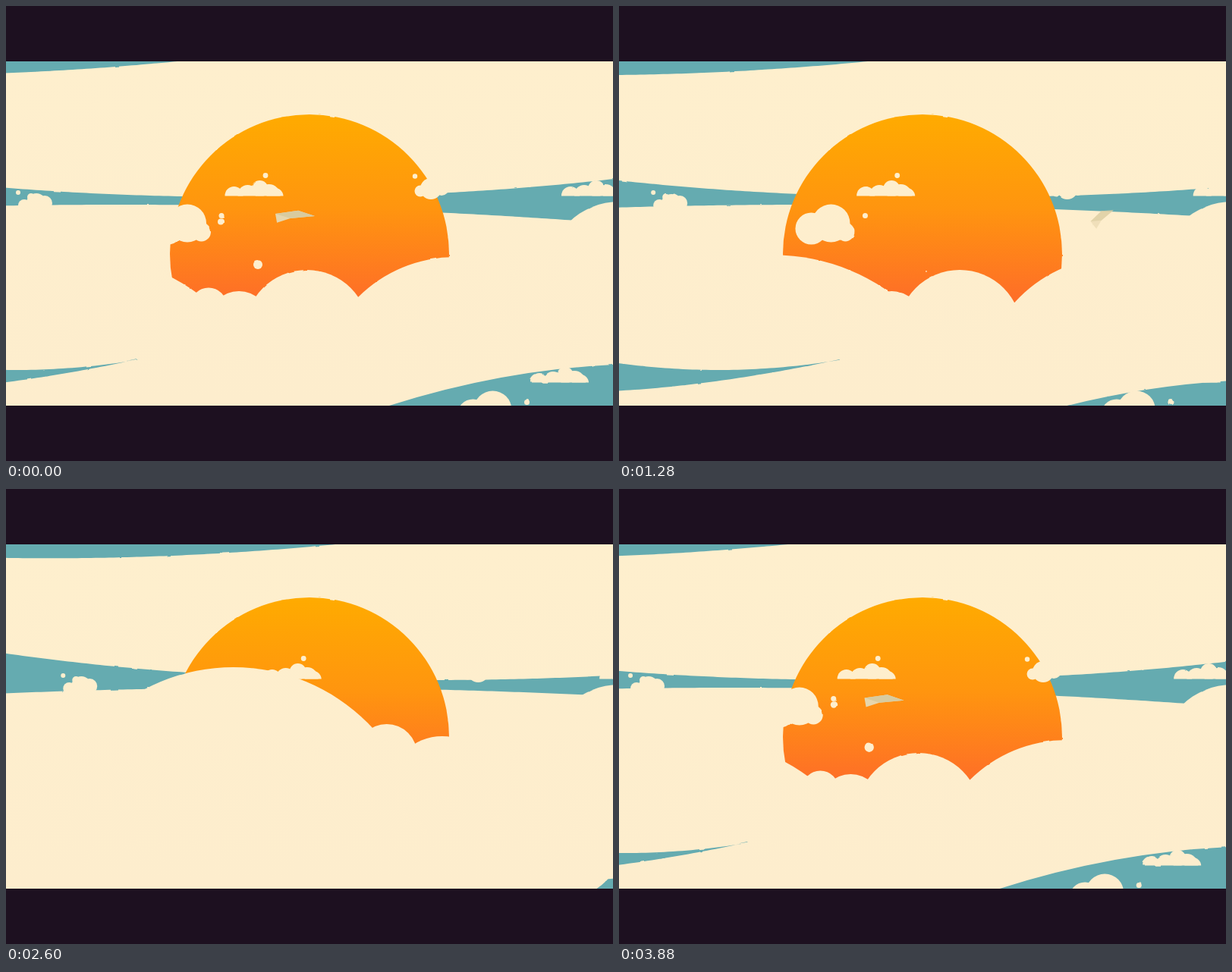
Animation, 800 px wide and 600 px high, one loop 3.92 s. Source, as an HTML page with a canvas:

```html
<!DOCTYPE html>
<html>
<head>
<meta charset="utf-8">
<style>
html, body { margin: 0; width: 100%; height: 100%; overflow: hidden; background: #1d1020; }
#stage { position: absolute; left: 0; top: 73px; width: 800px; height: 454px; overflow: hidden; }
canvas { position: absolute; left: -20px; top: -73px; filter: url(#rough); }
svg { position: absolute; width: 0; height: 0; }
</style>
</head>
<body>
<svg><filter id="rough" x="0" y="0" width="1" height="1" color-interpolation-filters="sRGB">
  <feTurbulence type="fractalNoise" baseFrequency=".05" numOctaves="2" seed="4"/>
  <feDisplacementMap in="SourceGraphic" scale="2" xChannelSelector="R" yChannelSelector="G"/>
</filter></svg>
<div id="stage"><canvas width="840" height="600"></canvas></div>
<script>
const ctx = document.querySelector('canvas').getContext('2d');
ctx.translate(20, 0);
const LOOP = 3920, STEP = 40, CUT = 2940;
const LEFT = -20, RIGHT = 820, BOTTOM = 600;

function gradient(y0, y1, ...colors) {
  const g = ctx.createLinearGradient(0, y0, 0, y1);
  colors.forEach((c, i) => g.addColorStop(i / (colors.length - 1), c));
  return g;
}
const BLUE = '#65abb0';
const CREAM = gradient(73, 527, '#feefcd', '#fdedcd');
const SUN = gradient(143, 390, '#ffab00', '#ff950f', '#fe6d28');

// Bank edges as height over x
const upperTop = x => 91.3 - 18.3 * ((x + 150) / 376) ** 2;
const upperBottom = x => 252 - 34 * Math.abs((x - 340) / 540) ** 2.2;
const lowerTop = x => 262 + 5.8e-5 * (x - 150) ** 2;
const stripTop = x => 480 - 5.2e-4 * (x + 160) ** 2;
const stripBottom = x => 509 - 43 * Math.abs(x / 340 + 1) ** 1.7;

// Clouds as circles: x, y, radius
const flatCloud = [[12, 250, 12], [30, 249, 13], [46, 241, 11], [58, 250, 15], [66, 251, 11]];
const puffyCloud = [[213, 293.5, 21], [239, 286.5, 25], [257.5, 298, 12.5], [239, 300, 11], [284, 276.5, 3.5]];
const leftCloud = [[24, 263, 8], [33, 252, 5], [40, 260, 13], [51, 260, 10], [16, 246, 3]];
const rightCloud = [[546, 244, 7.5], [560, 241, 14], [574, 240, 10], [539, 224.5, 3.2]];
const bumps = [[267, 395.5, 24], [307, 416, 40], [396.5, 430, 82]];
const coverFront = [[300, 485, 250], [502, 350, 40], [575, 396, 70], [735, 460, 80]];

// Paper plane: time, x, y, length, angle, spread, opacity
const flight = [
  [-560, -60, 300, 52, 0, 1, 1],
  [0, 381, 277, 52, 0, 1, 1],
  [880, 651, 283, 42, -.9, 2, .8],
  [1680, 624, 273, 25, -.2, 1.2, .4],
  [1960, 606, 272, 20, 0, 1, 0]
];

function shape(color, draw) {
  ctx.fillStyle = color;
  ctx.beginPath();
  draw();
  ctx.fill();
}
function plot(edge, from, to, dx) {
  const step = Math.sign(to - from) * 6;
  for (let x = from; (to - x) * step > 0; x += step) ctx.lineTo(x, edge(x - dx));
  ctx.lineTo(to, edge(to - dx));
}
function circles(list, dx, dy = 0) {
  for (const [x, y, r] of list) shape(CREAM, () => ctx.arc(x + dx, y + dy, Math.max(r, 0), 0, 7));
}
function clipped(bottom, draw) {
  ctx.save();
  ctx.beginPath();
  ctx.rect(LEFT, 0, RIGHT - LEFT, bottom);
  ctx.clip();
  draw();
  ctx.restore();
}
function drawFlatCloud(x, dy) {
  clipped(250.5 + dy, () => circles(flatCloud, x, dy));
  circles([[53.5, 223.5, 3.4]], x, dy);
}

function drawSky(t) {
  const drift = .08 * t;
  shape(BLUE, () => ctx.rect(LEFT, 0, RIGHT - LEFT, BOTTOM));
  shape(CREAM, () => {
    plot(upperTop, LEFT, RIGHT, drift);
    plot(upperBottom, RIGHT, LEFT, drift);
  });
  shape(CREAM, () => {
    plot(lowerTop, LEFT, RIGHT, drift);
    ctx.lineTo(RIGHT, BOTTOM);
    ctx.lineTo(LEFT, BOTTOM);
  });
  circles([[808, 352, 94]], 0);
  circles(leftCloud, .0228 * t);
}

function drawSun(t) {
  clipped(391, () => shape(SUN, () => ctx.arc(400, 327, 184, 0, 7)));
  drawFlatCloud(288.5 + .0193 * t, 0);
  drawFlatCloud(732 + .0193 * t, 0);
  circles(rightCloud, .024 * t);
  circles(puffyCloud, .0316 * t);
  if (t > -450) circles([[332 + .057 * t, 341 + .007 * t, 6 - .004 * t], [283, 284.5, 4 - .005 * t]], 0);
  circles(bumps, .041 * t);
  circles([[592, 512, 181]], .05 * t);
  circles([[98, 590.5, 262]], .083 * t);
}

function drawLowerSky(t) {
  const tip = 173 + .092 * t;
  shape(BLUE, () => {
    plot(stripTop, tip - 440, tip, tip);
    plot(stripBottom, tip, tip - 440, tip);
  });
  const left = 505 + .08 * t - 1e-5 * t * t;
  const right = 473 + .018 * t - 9e-7 * t * t;
  const bulge = Math.max(0, 20 - .008 * t);
  shape(BLUE, () => {
    ctx.moveTo(left, 527);
    ctx.quadraticCurveTo((left + 800) / 2, (527 + right) / 2 - bulge, 800, right);
    ctx.lineTo(RIGHT, right);
    ctx.lineTo(RIGHT, BOTTOM);
    ctx.lineTo(left, BOTTOM);
  });
  // bank that trims the blue corner on its way out to the right
  shape(CREAM, () => {
    const x = 799 + .055 * t;
    ctx.moveTo(x, 462);
    ctx.quadraticCurveTo(x + 16, 471, x + 60, 477);
    ctx.lineTo(x + 60, 440);
    ctx.lineTo(x, 440);
  });
  drawFlatCloud(691 + .0193 * t, 246);
  circles(puffyCloud, 402.5 + .0316 * t, 246);
}

function drawPlane(t) {
  const next = flight.findIndex(key => key[0] > t);
  if (next < 1) return;
  const from = flight[next - 1], to = flight[next];
  const p = (t - from[0]) / (to[0] - from[0]);
  const [, x, y, length, angle, spread, alpha] = from.map((v, i) => v + (to[i] - v) * p);
  const facet = (color, ...pts) => shape(color, () => pts.forEach(pt => ctx.lineTo(...pt)));
  const back = [-.5, -.06], top = [.08, -.14], nose = [.5, 0], fold = [-.12, .06], tail = [-.46, .17];
  ctx.save();
  ctx.globalAlpha = alpha;
  ctx.translate(x, y);
  ctx.rotate(angle);
  ctx.scale(length, length * spread);
  facet('#e6d6ad', back, top, nose, fold, tail);
  facet('#d8cb9f', back, top, nose, fold);
  ctx.restore();
}

function drawCover(time) {
  const k = time - 2240;
  if (k < -240 || k > 1000) return;
  const x = -735 + 1.6 * k + .001225 * k * k;
  circles(coverFront, x);
  shape(CREAM, () => ctx.rect(x - 100, 380, 835, 160));
  shape(CREAM, () => ctx.roundRect(x - 1260, 40, 1230, 560, 120));
}

function frame() {
  const time = Math.floor(performance.now() % LOOP / STEP) * STEP;
  const t = time < CUT ? time : time - LOOP;
  drawSky(t);
  drawSun(t);
  drawLowerSky(t);
  drawPlane(t);
  drawCover(time);
  requestAnimationFrame(frame);
}
frame();
</script>
</body>
</html>
```
